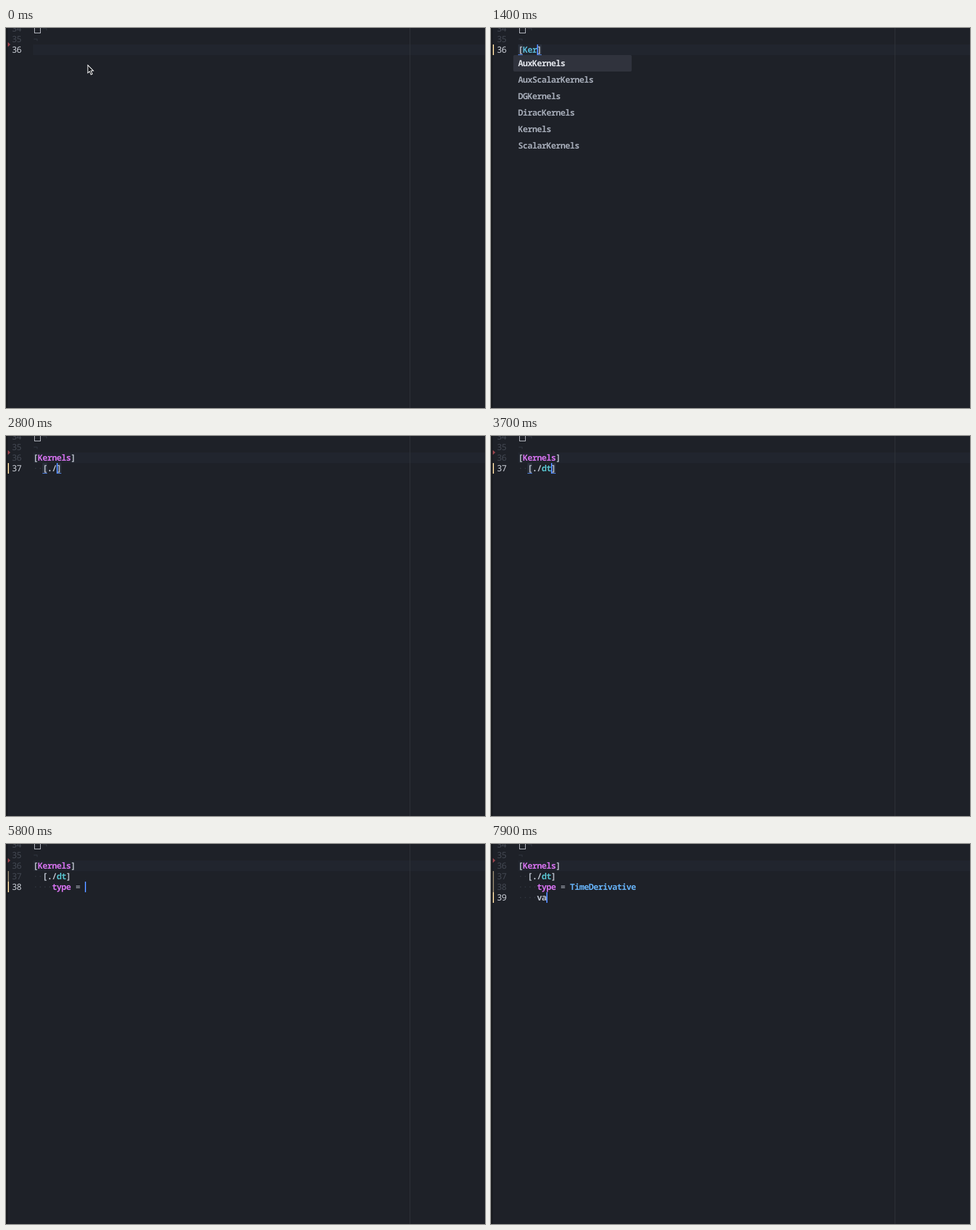
An HTML page that plays this animation: 814x646 px, repeating every 8000 ms.

```html
<!DOCTYPE html>
<html lang="en">
<head>
<meta charset="utf-8">
<title>Editor autocomplete</title>
<style>
  html, body { margin: 0; width: 100%; height: 100%; overflow: hidden; background: #1e2128; }
  #stage { position: relative; width: 814px; height: 646px; overflow: hidden; background: #1e2128; }
  #stage div, #stage svg { position: absolute; }
  .edge { left: 0; top: 0; width: 3px; height: 646px; background: #181a1f; }
  .active { left: 46px; top: 28px; width: 768px; height: 18px; background: #21252e; }
  .guide { left: 686px; top: 0; width: 1px; height: 646px; background: #30343b; }
  .code, .num, .row {
    font: 600 14.5px/18px "Noto Sans Mono", "DejaVu Sans Mono", monospace;
    letter-spacing: calc(8px - 1ch);
    text-rendering: geometricPrecision;
    white-space: pre;
    color: #b9bfca;
  }
  .num { left: 10px; font-weight: 400; color: #434852; }
  .num.on { color: #ced2da; }
  .code { left: 46px; }
  .code i, .row i { font-style: normal; }
  .code.dim, .dim { color: #343943; font-weight: 400; }
  .brackets { left: 48px; top: -8px; width: 9px; height: 15px; border: 1.5px solid #ced2da; }
  .op { font-weight: 400; }
  .key { color: #d371ec; }
  .name { color: #5ab8d6; }
  .sub { color: #56bfca; }
  .val { color: #66b1f5; }
  .bar { left: 3px; width: 2px; height: 18px; background: #857a66; }
  .bar.on { background: #e6cb96; }
  .caret { width: 2px; height: 18px; background: #528bff; }
  .match { width: 8px; height: 17px; border-bottom: 1px solid #528bff; background: #2a303b; }
  .row { height: 28px; line-height: 28px; text-indent: 8px; color: #a3a9b5; }
  .row.on { background: #30333d; border-radius: 2px; color: #e0e3e9; }
  .row.on.pick { font-weight: 700; }
  .row b { color: #fff; }
  .icon { left: 40px; top: 82px; width: 28px; height: 28px; background: #393c48; border-radius: 3px 0 0 0; }
  .note {
    left: 48px; top: 110px;
    font: 600 13.2px/28px "Open Sans", "Noto Sans", sans-serif;
    text-rendering: geometricPrecision;
    white-space: pre; color: #c0c4cc;
  }
</style>
</head>
<body>
<div id="stage">
  <div class="edge"></div>
  <div class="active"></div>
  <div class="num" style="top:-8px">34</div>
  <div class="num" style="top:10px">35</div>
  <div class="brackets"></div>
  <div class="code dim" style="left:62px;top:-8px">¬</div>
  <div class="code dim" style="top:10px">¬</div>
  <div id="view"></div>
  <div class="guide"></div>
  <svg id="mouse" width="13" height="19" viewBox="0 0 13 19">
    <path d="M1 1V14.5L4 11.6 6.4 17.2 8.8 16.2 6.4 10.8H10.6Z" fill="#15171b" stroke="#fff" stroke-width="1.1"/>
  </svg>
</div>
<script>
const LOOP = 8000, LEFT = 46, TOP = 28, CELL = 8, LINE = 18, ROW = 28;
const view = document.getElementById('view');
const mouse = document.getElementById('mouse');

const tag = (cls, text) => `<i class="${cls}">${text}</i>`;
const indent = n => tag('dim', '·'.repeat(n));
const box = (cls, x, y, text = '', extra = '') =>
  `<div class="${cls}" style="left:${x}px;top:${y}px;${extra}">${text}</div>`;

const head = `[${tag('key', 'Kernels')}]`;
const block = name => indent(2) + `[./${tag('sub', name)}]`;
const open = name => `[${tag('name', name)}]`;
const param = rest => indent(4) + tag('key', 'type') + rest;
const assign = value => param(` ${tag('op', '=')} ` + tag('val', value));
const inner = [head, block('dt')];
const done = [...inner, assign('TimeDerivative')];

const kernels = pick => ({
  x: 38, w: 201, pick, bold: true,
  items: ['AuxKernels', 'AuxScalarKernels', 'DGKernels', 'DiracKernels', 'Kernels', 'ScalarKernels']
});
const typeHint = prefix => ({
  x: 40, w: 464, pick: 0, indent: 38, icon: true,
  items: [`<b>${prefix}</b>${'type'.slice(prefix.length)}`],
  note: 'A string representing the Moose Object that will be built by this Action'
});
const valueHint = prefix => ({
  x: 126, w: 201, pick: 0,
  items: [`<b>${prefix}</b>${'TimeDerivative'.slice(prefix.length)}`]
});

// Each step patches the state: text lines, caret column, matched bracket columns, popup, pointer.
const steps = [
  [0, { lines: [''], caret: null, match: [], popup: null, mouse: [138, 62] }],
  [100, { mouse: [128, 56] }],
  [200, { mouse: [115, 48] }],
  [300, { mouse: [106, 42] }],
  [400, { mouse: [101, 39] }],
  [600, { caret: 0, mouse: null }],
  [700, { lines: ['[]'], caret: 1, match: [0, 1] }],
  [900, { lines: [open('K')], caret: 2, match: [0, 2] }],
  [1000, { popup: kernels(0) }],
  [1100, { lines: [open('Ke')], caret: 3, match: [0, 3] }],
  [1300, { lines: [open('Ker')], caret: 4, match: [0, 4] }],
  [1700, { popup: kernels(1) }],
  [1800, { popup: kernels(3) }],
  [1900, { popup: kernels(4) }],
  [2100, { lines: [head], caret: 8, match: [0, 8], popup: null }],
  [2300, { caret: 9 }],
  [2400, { lines: [head, indent(2)], caret: 2, match: [] }],
  [2600, { lines: [head, indent(2) + '[]'], caret: 3, match: [2, 3] }],
  [2700, { lines: [head, indent(2) + '[.]'], caret: 4, match: [2, 4] }],
  [2800, { lines: [head, block('')], caret: 5, match: [2, 5] }],
  [3500, { caret: null }],
  [3700, { lines: inner, caret: 7, match: [2, 7] }],
  [4000, { caret: 8 }],
  [4300, { lines: [...inner, indent(4)], caret: 4, match: [] }],
  [4500, { caret: null }],
  [4700, { lines: [...inner, indent(4) + 't'], caret: 5 }],
  [4800, { popup: typeHint('t') }],
  [4900, { lines: [...inner, indent(4) + 'ty'], caret: 6 }],
  [5000, { popup: typeHint('ty') }],
  [5200, { caret: null }],
  [5300, { lines: [...inner, param('')], caret: 8, popup: null }],
  [5600, { caret: 9 }],
  [5700, { lines: [...inner, assign('')], caret: 10 }],
  [5800, { caret: 11 }],
  [6000, { lines: [...inner, assign('T')], caret: 12 }],
  [6100, { popup: valueHint('T') }],
  [6200, { lines: [...inner, assign('Ti')], caret: 13, popup: valueHint('Ti') }],
  [6400, { caret: null }],
  [6600, { caret: 13 }],
  [6800, { lines: done, caret: 25, popup: null }],
  [7200, { lines: [...done, indent(4)], caret: 4 }],
  [7400, { caret: null }],
  [7600, { caret: 4 }],
  [7800, { lines: [...done, indent(4) + 'v'], caret: 5 }],
  [7900, { lines: [...done, indent(4) + 'va'], caret: 6 }]
];

let last = {};
const states = steps.map(([, patch]) => last = { ...last, ...patch });

function drawPopup(p, y) {
  let html = p.items.map((text, i) => {
    const on = i === p.pick ? ' on' + (p.bold ? ' pick' : '') : '';
    return box('row' + on, p.x, y + i * ROW, text, `width:${p.w}px;text-indent:${p.indent || 8}px`);
  }).join('');
  if (p.icon) {
    html += '<div class="icon"><svg width="28" height="28" fill="none" stroke="#c678dd">' +
      '<circle cx="14" cy="15" r="3.5" stroke-width="3"/>' +
      '<circle cx="14" cy="15" r="5.2" stroke-width="2.2" stroke-dasharray="2.04" stroke-dashoffset="1"/></svg></div>';
  }
  return html + (p.note ? `<div class="note">${p.note}</div>` : '');
}

function draw(s) {
  const end = s.lines.length - 1;
  const rowTop = i => TOP + i * LINE;
  const colX = c => LEFT + c * CELL;
  const fresh = end === 0 && s.lines[0] !== '';
  let html = s.match.map(c => box('match', colX(c), rowTop(end))).join('');
  s.lines.forEach((text, i) => {
    const on = i === end ? ' on' : '';
    html += box('num' + on, 10, rowTop(i), 36 + i) + box('code', LEFT, rowTop(i), text);
    if (i > 0 || fresh) html += box('bar' + on, 3, rowTop(i));
  });
  if (!fresh) {
    html += '<svg style="left:3px;top:24px" width="5" height="8"><path d="M0 0L4.5 4 0 8Z" fill="#96434c"/></svg>';
  }
  if (s.popup) html += drawPopup(s.popup, rowTop(end + 1));
  if (s.caret !== null) html += box('caret', colX(s.caret), rowTop(end));
  view.innerHTML = html;
  mouse.style.display = s.mouse ? '' : 'none';
  if (s.mouse) [mouse.style.left, mouse.style.top] = s.mouse.map(v => v + 'px');
}

let shown = -1;
function tick() {
  const t = performance.now() % LOOP;
  const i = steps.findLastIndex(([at]) => at <= t);
  if (i !== shown) draw(states[shown = i]);
  requestAnimationFrame(tick);
}
tick();
</script>
</body>
</html>
```
